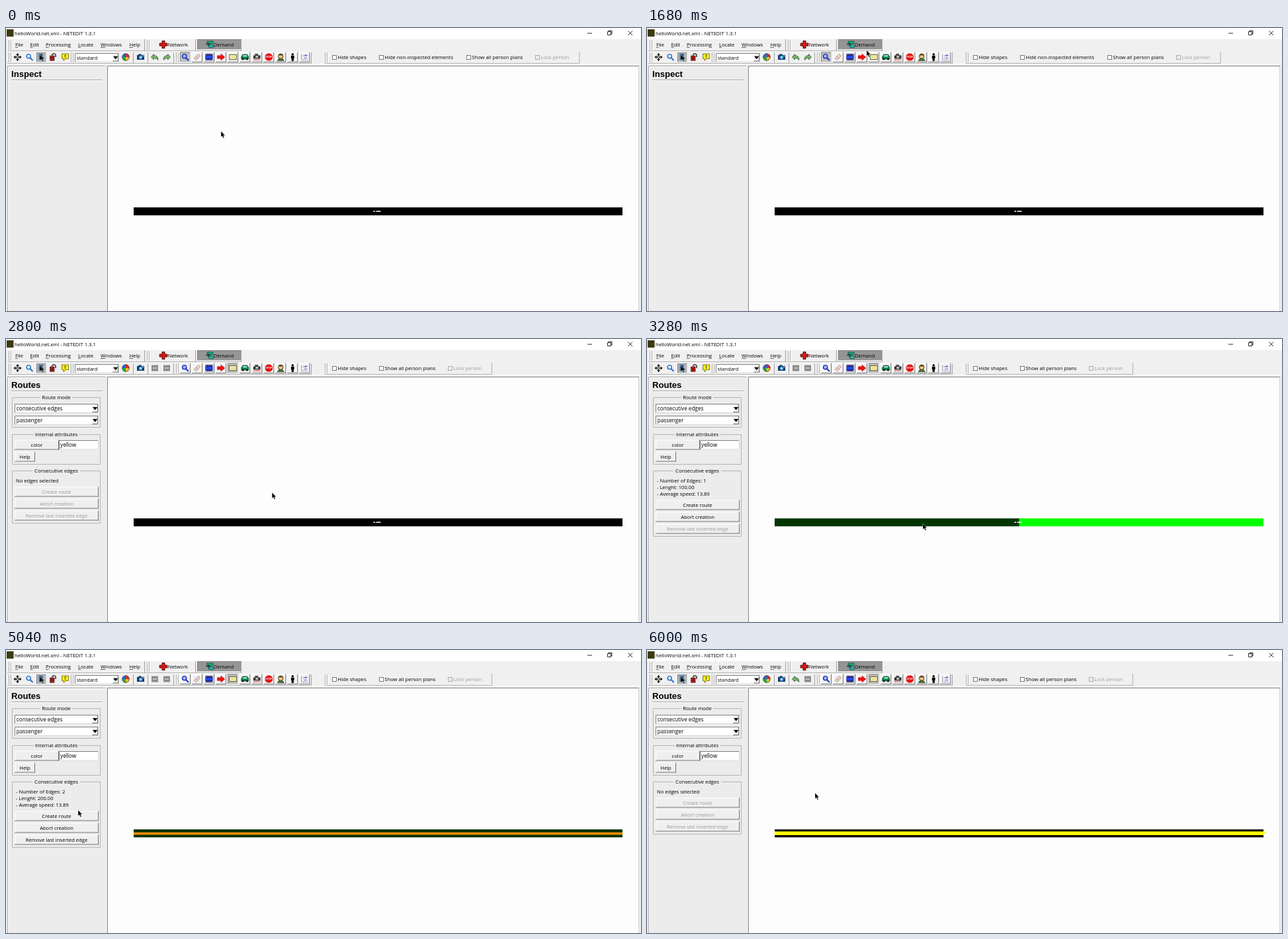
An HTML page that plays this animation: 960 px wide and 428 px high, repeating every 6480 ms.

```html
<!DOCTYPE html>
<html lang="en">
<head>
<meta charset="utf-8">
<title>Route creation</title>
<style>
  html, body { margin: 0; width: 100%; height: 100%; overflow: hidden; background: #f0f0f0; }
  svg { display: block; width: 960px; height: 428px; }
  text { font: 7.6px "Open Sans", "Noto Sans", sans-serif; fill: #000; white-space: pre; }
  .head { font: bold 13.1px "Liberation Sans", Arial, sans-serif; }
  .field { font-size: 8.2px; }
  .off { fill: #9a9a9a; }
  .mid { text-anchor: middle; }
</style>
</head>
<body>
<svg id="stage" viewBox="0 0 960 428"></svg>
<script>
const LOOP = 6480, STEP = 80;
const MODE = 2400, FIRST = 3040, SECOND = 4160, DONE = 5440;

// Drawing helpers
const rect = (x, y, w, h, fill, more = '') =>
  `<rect x="${x}" y="${y}" width="${w}" height="${h}" fill="${fill}" ${more}/>`;
const path = (d, fill = 'none', stroke = 'none', w = 1) =>
  `<path d="${d}" fill="${fill}" stroke="${stroke}" stroke-width="${w}"/>`;
const circle = (x, y, r, fill, stroke = 'none', w = 1) =>
  `<circle cx="${x}" cy="${y}" r="${r}" fill="${fill}" stroke="${stroke}" stroke-width="${w}"/>`;
const text = (x, y, s, cls = '') => `<text x="${x}" y="${y}" class="${cls}">${s}</text>`;
const at = (x, y, s) => `<g transform="translate(${x} ${y})">${s}</g>`;
const during = (from, to, s) => `<g data-from="${from}" data-to="${to}">${s}</g>`;

const bevel = (x, y, w, h, fill = '#efefef') =>
  rect(x, y, w, h, fill) +
  path(`M${x} ${y + h - .5}h${w}M${x + w - .5} ${y}v${h}`, 'none', '#747474') +
  path(`M${x} ${y + .5}h${w - 1}M${x + .5} ${y}v${h - 1}`, 'none', '#fff');
const sunken = (x, y, w, h, fill = '#fff') =>
  rect(x, y, w, h, fill) +
  path(`M${x + .5} ${y + h}v${.5 - h}h${w - .5}`, 'none', '#808080') +
  path(`M${x} ${y + h - .5}h${w - .5}v${-h}`, 'none', '#d8d8d8');
const grip = (x, y, h) =>
  [0, 3].map(i => path(`M${x + i + .5} ${y}v${h}`, 'none', '#aaa') +
    path(`M${x + i + 1.5} ${y}v${h}`, 'none', '#fff')).join('');
const edge = (x, y, h) => path(`M${x + .5} ${y}v${h}`, 'none', '#a0a0a0');
const combo = (x, y, w, h, s, cls) =>
  sunken(x, y, w, h) + bevel(x + w - 10, y + 1, 9, h - 2) +
  path(`M${x + w - 9} ${y + h / 2 - 2}h7.4l-3.7 4.6z`, '#000') +
  text(x + 2.8, y + h / 2 + 2.8, s, cls);
const button = (x, y, w, s, off) =>
  bevel(x, y, w, 15) + text(x + w / 2, y + 10.3, s, off ? 'mid off' : 'mid');
const group = (y, bottom, label, half) =>
  path(`M9.5 ${y + .5}h133v${bottom - y}h-133z`, 'none', '#b4b4b4') +
  rect(76 - half, y - 4, half * 2, 9, '#ececec') + text(76, y + 2.8, label, 'mid');
const check = (x, s, off) =>
  rect(x + .5, 41.5, 6, 6, off ? '#eee' : '#fff', `stroke="${off ? '#aaa' : '#777'}"`) +
  text(x + 8.3, 47.2, s, off ? 'off' : '');

// Icons, centred on the origin
const lens = (ring, glass) => path('M1 1L5 5', 'none', ring, 2) + circle(-1.3, -1.3, 3.1, glass, ring, 1.4);
const turn = c => path('M-5.5 0L-1.5 -4.5V-2.3C3 -2.5 5.5 0 4.5 4.5C3.5 2 1.5 1.4 -1.5 1.7V4z', c, '#1c3a1c', .7);
const flip = s => `<g transform="scale(-1 1)">${s}</g>`;
const dull = rect(-5, -4.5, 10, 9, '#8c8c8c') + path('M-3 0h6', 'none', '#ddd', 1.3);
const icons = {
  move: path('M0 -5.5V5.5M-5.5 0H5.5', 'none', '#111', 1.2) +
    path('M0 -6l2.4 3h-4.8zM0 6l2.4 -3h-4.8zM-6 0l3 -2.4v4.8zM6 0l-3 -2.4v4.8z', '#111') + circle(0, 0, 1.7, '#fff', '#111'),
  zoom: lens('#2870c0', '#d8efff'),
  pick: rect(-4, -5, 6, 9, '#245a94') + path('M-3 -4L5 2.5L1.5 3L3.5 6L1.5 6.5L0 3.6L-3 5z', '#111', '#9cc8e8', .6),
  lock: path('M-1 -2.5V-4.2Q1.5 -6.5 4 -3.8V0', 'none', '#333', 1.5) + rect(-4.2, -1.8, 6, 6.8, '#d42020', 'stroke="#400"') + rect(-2, 0, 1.6, 3, '#111'),
  hint: path('M-5 -5H5V2.4H1L-2.5 5.5V2.4H-5z', '#f8ee20', '#665c00', .8) + path('M0 -3.6V-.5M0 .4V1.6', 'none', '#222', 1.2),
  wheel: ['#e02828', '#e8c020', '#30a838', '#2468d0'].map((c, i) =>
    `<path d="M0 0V-5.5A5.5 5.5 0 0 1 5.5 0z" fill="${c}" transform="rotate(${i * 90})"/>`).join('') + circle(0, 0, 5.3, 'none', '#333', .7),
  photo: rect(-5.5, -3.2, 11, 7.2, '#123c70') + rect(-3, -4.7, 4, 2, '#123c70') + circle(0, .4, 2.5, '#9ad8ff', '#2870b0') + rect(3, -2.3, 1.6, 1.2, '#fff'),
  inspect: lens('#1830c0', '#a8b8f0'),
  erase: path('M-4.8 2L1.8 -4.7L4.8 -2L-1.5 4.8z', '#f2d0c8', '#a88', .8) + path('M-2 -1L1.3 2', 'none', '#b88', .8),
  film: rect(-5.5, -5, 11, 10, '#050560') + rect(-5.5, -2, 11, 4, '#2448f0') +
    path('M-5 -3.6H5.5M-5 3.6H5.5', 'none', '#fff', 1).replace('/>', ' stroke-dasharray="1.4 1.4"/>'),
  arrow: path('M-5.5 -2.3H0V-5L5.8 0L0 5V2.3H-5.5z', '#f01010', '#900', .5),
  route: rect(-5.2, -3.7, 10.4, 7.4, '#fffbc0', 'stroke="#575020"') + path('M-3 -1H3M-3 1.2H3', 'none', '#c8bd60', .9),
  car: path('M-5.5 -.8L-3.3 -4H3.3L5.5 -.8V3H-5.5z', '#088848', '#033', .7) + rect(-3, -2.8, 6, 2, '#b8eed0') +
    circle(-3.2, 3, 1.5, '#111') + circle(3.2, 3, 1.5, '#111'),
  flow: rect(-3, -5.2, 5, 3, '#555') + rect(-5.3, -2.6, 10.6, 5, '#333') + rect(-2, -1.6, 4, 2.4, '#ddd') +
    path('M-5 4.2H5', 'none', '#e03030', 1.6).replace('/>', ' stroke-dasharray="2 1"/>'),
  stop: path('M-2.4 -5.6H2.4L5.6 -2.4V2.4L2.4 5.6H-2.4L-5.6 2.4V-2.4z', '#e81212') +
    '<text y="1.4" class="mid" style="font-size:3.8px;font-weight:bold;fill:#fff">STOP</text>',
  face: path('M-5 5.5Q-4 2 0 2T5 5.5z', '#3c7a30', '#222', .6) + circle(0, -1.3, 3.7, '#e8c888', '#443010') + path('M-3.5 -2.5Q0 -7 3.5 -2.5z', '#5c4418'),
  person: circle(0, -4.2, 1.7, '#000') + path('M-2.4 -2.2H2.4V2H1.6V6H-1.6V2H-2.4z', '#000'),
  plan: path('M-4.5 -4V4.5H4.5', 'none', '#4450a0', 1).replace('/>', ' stroke-dasharray="1.5 1.2"/>') +
    path('M-2 -2H1M2 -4.5V-.5M0 -2.5H4.5M-1 1.5H4', 'none', '#5868b8', 1),
  network: path('M-2 -5.5H2V-2H5.8V2H2V5.5H-2V2H-5.8V-2H-2z', '#d81818', '#400', .9),
  demand: rect(-4, -5, 9, 3.6, '#20a878', 'stroke="#043" stroke-width=".7"') + rect(-1, .8, 6.4, 4, '#28b8b0', 'stroke="#043" stroke-width=".7"') +
    path('M-6 -.5H1M-2 -3V3', 'none', '#0c5040', 1.4)
};
const tool = (name, x, fill) =>
  (fill ? sunken(x - 8, 36.5, 16, 15.5, fill) : bevel(x - 8, 36.5, 16, 15.5, '#f3f3f3')) + at(x, 44, icons[name]);

const menus = [['File', 14, 4], ['Edit', 36.5, 4], ['Processing', 60, 4.6], ['Locate', 109, 4],
  ['Windows', 143, 7], ['Help', 186.5, 5.5]];

const chrome =
  rect(0, 0, 960, 428, '#f0f0f0') + rect(0, 0, 960, 16, '#fff') + rect(1, 2, 10.5, 11, '#3c3a10') +
  text(13, 10.9, 'helloWorld.net.xml - NETEDIT 1.3.1') +
  path('M879 8h7M909.5 5.5h5v5h-5zM911 5.5v-1.5h5v5h-1.5M940.5 4.5l6.5 6.5M947 4.5l-6.5 6.5', 'none', '#111', .9) +
  path('M0 16.5H960M0 35.5H356M0 54.5H960', 'none', '#fbfbfb') +
  path('M2 34.5H356M2 53.5H462', 'none', '#b0b0b0') +
  grip(4, 18, 15) + edge(209, 17, 17) + grip(213, 18, 15) + edge(286, 17, 17) +
  menus.map(([s, x, w]) => text(x, 28, s) + path(`M${x} 29.4h${w}`, 'none', '#000', .6)).join('') +
  at(238, 25, icons.network) + text(244.8, 28, 'Network') +
  sunken(289, 17, 67, 16, '#959595') + edge(355, 17, 17) + at(308, 25, icons.demand) + text(314, 28, 'Demand') +
  grip(4, 37, 15) + at(17.5, 44, icons.move) + at(35.5, 44, icons.zoom) + sunken(46, 37, 15, 15, '#b4b4b4') +
  at(53.5, 44, icons.pick) + at(71, 44, icons.lock) + at(89.5, 44, icons.hint) + grip(98, 37, 15) +
  combo(104, 38, 67, 13.5, 'standard') + at(181, 44, icons.wheel) + edge(192, 37, 16) +
  at(203.5, 44, icons.photo) + edge(214, 37, 16) + edge(253, 37, 16) + grip(257, 37, 15) +
  ['erase', 'film', 'arrow'].map((n, i) => tool(n, 289 + i * 18)).join('') +
  ['car', 'flow', 'stop', 'face', 'person', 'plan'].map((n, i) => tool(n, 361.3 + i * 18)).join('') +
  edge(461, 37, 16) + grip(482, 37, 15) + check(493, 'Hide shapes') +
  rect(0, 56, 960, 372, '#ececec') + path('M2.5 428V57.5H150', 'none', '#a8a8a8') + path('M3.5 428V58.5H150', 'none', '#fff') +
  path('M8 78.5H146', 'none', '#aaa') + path('M8 79.5H146', 'none', '#fff') +
  rect(153, 57, 804, 371, '#fdfdfd') + path('M153.5 428V57.5H957', 'none', '#868686') + path('M956.5 58V428', 'none', '#d4d4d4');

const toolbar =
  during(0, MODE, at(225, 44, turn('#78b868')) + at(243, 44, flip(turn('#78b868'))) +
    tool('inspect', 271, '#c0c0c0') + tool('route', 343) +
    check(564, 'Hide non-inspected elements') + check(696, 'Show all person plans') +
    check(800, 'Lock person', true) + path('M482 53.5H867V36', 'none', '#b0b0b0')) +
  during(MODE, DONE, at(225, 44, dull)) + during(DONE, LOOP, at(225, 44, turn('#78b868'))) +
  during(MODE, LOOP, at(243, 44, dull) + tool('inspect', 271) + tool('route', 343, '#c0c0c0') +
    check(564, 'Show all person plans') + check(668, 'Lock person', true) +
    path('M482 53.5H734.5V36', 'none', '#b0b0b0'));

// Lower group of the side panel: empty, or listing the chosen edges
const emptyList = group(199, 278, 'Consecutive edges', 36) + text(15, 217.2, 'No edges selected') +
  ['Create route', 'Abort creation', 'Remove last inserted edge'].map((s, i) => button(13, 223.5 + i * 18, 127, s, true)).join('');
const edgeList = n => group(199, 298, 'Consecutive edges', 36) +
  [`Number of Edges: ${n}`, `Lenght: ${n}00.00`, 'Average speed: 13.89'].map((s, i) => text(15, 217.2 + i * 10, '- ' + s)).join('') +
  ['Create route', 'Abort creation', 'Remove last inserted edge'].map((s, i) => button(13, 243.5 + i * 18, 127, s, i == 2 && n < 2)).join('');

const panel =
  during(0, MODE, text(8, 74, 'Inspect', 'head')) +
  during(MODE, LOOP, text(8, 74, 'Routes', 'head') +
    group(88, 133, 'Route mode', 24) + combo(13, 98, 127, 14, 'consecutive edges', 'field') +
    combo(13, 116, 127, 14, 'passenger', 'field') +
    group(144, 189, 'Internal attributes', 34) + button(13, 152.5, 67, 'color') +
    sunken(80, 153, 60, 14.5) + text(82, 163, 'yellow', 'field') + button(13, 170.5, 31, 'Help')) +
  during(MODE, FIRST, emptyList) + during(FIRST, SECOND, edgeList(1)) +
  during(SECOND, DONE, edgeList(2)) + during(DONE, LOOP, emptyList);

const lane = (fill, x = 193, w = 739) => rect(x, 271.3, w, 12, fill);
const mark = path('M555.5 277.3h2.5M559.5 277.3h7', 'none', '#fff', 1.4);
const road =
  during(0, FIRST, lane('#000') + mark) +
  during(FIRST, SECOND, lane('#033503', 193, 370) + lane('#00ff00', 562.5, 369.5) + mark) +
  during(SECOND, DONE, lane('#033003') + rect(193, 275.7, 739, 3.8, '#f58a08')) +
  during(DONE, LOOP, lane('#000') + rect(193, 274.4, 739, 5.6, '#ffff00') + path('M932 273.5l4 2l-4 3z', '#ffff00'));

const pointer = `<g id="pointer">${path('M0 0V9L2 7.3L3.5 10.6L5.1 9.9L3.6 6.7H6.3z', '#000', '#fff', .4)}</g>`;
const ring = '<circle id="ring" fill="none" stroke="#000" stroke-width="1.2"/>';

const stage = document.getElementById('stage');
stage.innerHTML = chrome + toolbar + panel + road + ring + pointer;
const parts = [...stage.querySelectorAll('[data-from]')].map(el => ({ el, from: +el.dataset.from, to: +el.dataset.to }));
const hand = document.getElementById('pointer'), halo = document.getElementById('ring');

// Pointer stops: time, x, y
const stops = [
  [0, 325, 156], [640, 325, 156], [1120, 323, 26], [1360, 323, 26], [2000, 341, 41], [2240, 342, 42],
  [2400, 342, 42], [2960, 417, 279], [3360, 417, 279], [4080, 626, 280], [4240, 626, 280],
  [5040, 109, 242], [5280, 108, 248], [5600, 108, 248], [6000, 254, 216], [LOOP, 254, 216]
];
// Clicks: start, end, ring radius
const clicks = [[1200, 1360, 22.5], [2320, 2400, 14.5], [FIRST, FIRST + 80, 22.5], [SECOND, SECOND + 80, 14.5], [DONE, DONE + 80, 14.5]];
const ease = p => p * p * (3 - 2 * p);

function render(t) {
  for (const { el, from, to } of parts) el.style.display = t >= from && t < to ? '' : 'none';
  const i = stops.findIndex(s => s[0] > t);
  const [t0, x0, y0] = stops[i - 1], [t1, x1, y1] = stops[i];
  const p = ease((t - t0) / (t1 - t0));
  const x = x0 + (x1 - x0) * p, y = y0 + (y1 - y0) * p;
  hand.setAttribute('transform', `translate(${x} ${y})`);
  const hit = clicks.find(([a, b]) => t >= a && t < b);
  halo.style.display = hit ? '' : 'none';
  if (hit) {
    halo.setAttribute('cx', x);
    halo.setAttribute('cy', y);
    halo.setAttribute('r', hit[2]);
  }
}

const start = performance.now();
function tick() {
  const t = (performance.now() - start) % LOOP;
  render(Math.floor(t / STEP) * STEP);
  requestAnimationFrame(tick);
}
tick();
</script>
</body>
</html>
```
